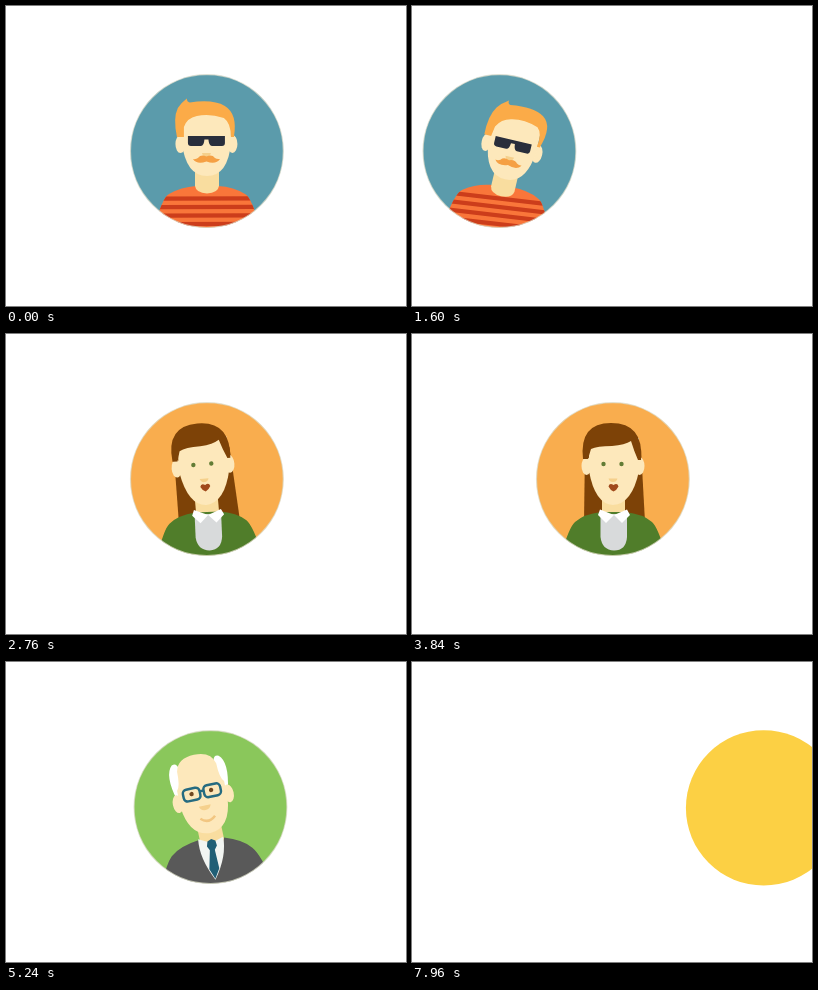
These frames come from a looping animation (400x300 px, 8 s). An HTML page:

```html
<!DOCTYPE html>
<html lang="en">
<head>
<meta charset="utf-8">
<title>Portrait carousel</title>
<style>
html, body { margin: 0; width: 100%; height: 100%; overflow: hidden; background: #fff; }
svg { display: block; width: 100vw; height: 100vh; }
.rim { fill: none; stroke: #dcdccb; stroke-width: 1.2; stroke-opacity: .75; }
.skin { fill: #fde8bb; }
.neck { fill: #f9dd9f; }
.shade { fill: #f5d08c; }
</style>
</head>
<body>
<svg viewBox="0 0 400 300">
  <defs>
    <clipPath id="disc"><circle cx="200.9" cy="145.1" r="76.7"/></clipPath>
    <clipPath id="shirt"><path id="torso" d="M146 232Q155 192 163 188Q175 181 190 180H212Q228 181 239 188Q247 192 256 232Z"/></clipPath>
  </defs>

  <g class="person">
    <g clip-path="url(#disc)">
      <circle cx="200.9" cy="145.1" r="76.7" fill="#5b9bab"/>
      <g class="body">
        <use href="#torso" fill="#f9763a"/>
        <path clip-path="url(#shirt)" d="M140 192.5H262M140 201H262M140 209.5H262M140 218H262" stroke="#cc3d1b" stroke-width="4.2"/>
      </g>
      <g class="head">
        <path class="neck" d="M189 160H213V180Q212 187 201 187.500Q190 187 189 180Z"/>
        <ellipse class="skin" cx="174.500" cy="138" rx="5" ry="9"/>
        <ellipse class="skin" cx="226.500" cy="138" rx="5" ry="9"/>
        <path class="skin" d="M176 107H225V137Q222 170 201 170Q180 170 176 137Z"/>
        <path class="hair" fill="#fbab48" d="M171 131Q167 112 172 102Q175 97 181 92.500Q181 96 184 96.500Q207 93 219 100Q232 108 228 131H225Q225 117 218 112Q203 107 191 110Q181 112 178 121V131Z"/>
        <path fill="#292e3b" d="M182 130H219V137Q219 140 216 140H206Q203 140 202.500 133.500H198.500Q198 140 195 140H185Q182 140 182 137Z"/>
        <path class="shade" d="M196 147H205Q204 151 200.500 151Q197 151 196 147Z"/>
        <path fill="#f5a044" d="M200.500 150.500Q206 148 209 152Q211 153.500 214 153Q210 159 200.500 155.500Q191 159 187 153Q190 153.500 192 152Q195 148 200.500 150.500Z"/>
      </g>
    </g>
    <circle class="rim" cx="200.9" cy="145.1" r="76.4"/>
  </g>

  <g class="person">
    <g clip-path="url(#disc)">
      <circle cx="200.9" cy="145.1" r="76.7" fill="#f9ad4e"/>
      <g class="head">
        <path fill="#7d4207" d="M173 115H229L233 188H172Z"/>
        <path class="neck" d="M190 155H213V184H190Z"/>
      </g>
      <g class="body">
        <path fill="#507d2a" d="M146 232Q156 194 163 188Q172 180 189 178H213Q231 180 240 188Q247 194 257 232Z"/>
        <path fill="#d8dadb" d="M188.500 180H215V203Q214 216.500 202 216.500Q190 216 188.500 203Z"/>
        <path fill="#fff" d="M188 175.500L202 181L194 189L186 181ZM215 175.500L202 181L210 189L218 181Z"/>
      </g>
      <g class="head">
        <ellipse class="skin" cx="174.500" cy="132" rx="5" ry="9"/>
        <ellipse class="skin" cx="227.500" cy="132" rx="5" ry="9"/>
        <path class="skin" d="M177 104H227V137Q220 170 201 171Q183 170 177 137Z"/>
        <path fill="#7d4207" d="M171 125Q167 89 199 89Q232 89 229 126H226Q222 117 219 107Q213 111 200 112Q185 112 179 115L176 125Z"/>
        <g class="eyes" fill="#627c35">
          <circle cx="191.500" cy="130" r="2.2"/><circle cx="209.500" cy="130" r="2.2"/>
        </g>
        <path class="shade" d="M196.500 144.500H205.500Q204.500 148 201 148Q197.500 148 196.500 144.500Z"/>
        <path fill="#a0491c" d="M201.500 151Q205.500 148.500 206.500 152.500Q204.500 156.500 201.500 157.500Q198.500 156.500 196.500 152.500Q197.500 148.500 201.500 151Z"/>
      </g>
    </g>
    <circle class="rim" cx="200.9" cy="145.1" r="76.4"/>
  </g>

  <g class="person">
    <g clip-path="url(#disc)">
      <circle cx="200.9" cy="145.1" r="76.7" fill="#8ac75b"/>
      <g class="head">
        <path class="neck" d="M189 160H213V184H189Z"/>
      </g>
      <g class="body">
        <path fill="#595959" d="M142 234Q152 199 160 190Q169 181 188 177L201 216L214 177Q232 181 241 190Q250 199 260 234Z"/>
        <path fill="#f2f5f2" d="M188 176L201 181L213 176Q215 195 201 218Q187 195 188 176Z"/>
        <path fill="#205f76" d="M197 179L201 177L205 179L206 184L203.500 188L206 207L201 217L196 207L198.500 188L196 184Z"/>
      </g>
      <g class="head">
        <path fill="#fff" d="M175 132Q168 105 177 97Q182 95 183 101L181 132ZM227 132Q234 105 225 97Q220 95 219 101L221 132Z"/>
        <ellipse class="skin" cx="175" cy="136" rx="5" ry="9"/>
        <ellipse class="skin" cx="227" cy="136" rx="5" ry="9"/>
        <path class="skin" d="M177 123Q181 119 181 104Q184 91 201 91Q218 91 221 104Q221 119 225 123V140Q222 170 201 171Q180 170 177 140Z"/>
        <g class="eyes" fill="#71471f">
          <circle cx="190.500" cy="129" r="2.200"/><circle cx="210.500" cy="129" r="2.200"/>
        </g>
        <g fill="none" stroke="#256b80" stroke-width="2.500">
          <rect x="182" y="123.500" width="17" height="12" rx="4"/>
          <rect x="203" y="123.500" width="17" height="12" rx="4"/>
          <path d="M199 128H203"/>
        </g>
        <path class="shade" d="M195 143H207Q206 147.500 201 147.500Q196 147.500 195 143Z"/>
        <path d="M194 155Q201 162 209 155" fill="none" stroke="#f2c681" stroke-width="2.500"/>
      </g>
    </g>
    <circle class="rim" cx="200.9" cy="145.1" r="76.4"/>
  </g>

  <g class="person"><circle cx="200.700" cy="145.900" r="77.700" fill="#fcd044"/></g>
</svg>
<script>
const LOOP = 8000, FIRST = 1124, STEP = 3117, MOVE = 1120, WIDTH = 400;
const BLINK = [2630, 2715];
// [ms since the slide began, degrees]
const LEAN_OUT = [[0, 0], [180, 1.5], [400, 7.5], [480, 13.5], [600, 16]];
const LEAN_IN = [[0, 16], [600, 16], [820, 0], [1000, -12], [1180, -12], [1640, -5], [2000, 0]];

const people = [...document.querySelectorAll('.person')].map(el => ({
  el,
  heads: el.querySelectorAll('.head'),
  hair: el.querySelector('.hair'),
  body: el.querySelector('.body'),
  eyes: el.querySelector('.eyes')
}));

// cubic-bezier(.7, 0, .3, 1)
function ease(x) {
  if (x <= 0) return 0;
  if (x >= 1) return 1;
  let lo = 0, hi = 1;
  for (let i = 0; i < 24; i++) {
    const s = (lo + hi) / 2, r = 1 - s;
    if (2.1 * s * r * r + 0.9 * s * s * r + s * s * s < x) lo = s; else hi = s;
  }
  return lo * lo * (3 - 2 * lo);
}

function track(keys, t) {
  if (t <= keys[0][0]) return keys[0][1];
  for (let i = 1; i < keys.length; i++) {
    const [a, from] = keys[i - 1], [b, to] = keys[i];
    if (t < b) return from + (to - from) * (t - a) / (b - a);
  }
  return keys[keys.length - 1][1];
}

const setTransform = (el, value) => el.setAttribute('transform', value);

function tilt(p, lean) {
  const pivot = 182 + 0.9 * lean;
  const drop = Math.max(0, lean) * 0.2;
  p.heads.forEach(h => setTransform(h, `translate(0 ${drop}) rotate(${lean} 201 ${pivot})`));
  setTransform(p.body, `rotate(${lean * 0.5} 201 ${pivot})`);
  if (p.hair) setTransform(p.hair, `translate(0 128) skewX(${-lean * 0.7}) translate(0 -128)`);
}

function pose(p, i, t) {
  const inT = t - FIRST - STEP * (i - 1);
  const outT = inT - STEP;
  const speedUp = 0.0035 * Math.max(0, outT - 480) ** 2;
  const x = WIDTH * (1 - ease(inT / MOVE)) - WIDTH * ease(outT / MOVE) - speedUp;
  p.el.style.display = Math.abs(x) < 279 ? '' : 'none';
  setTransform(p.el, `translate(${x.toFixed(2)} 0)`);
  if (!p.body) return;

  tilt(p, outT > 0 ? track(LEAN_OUT, outT) : track(LEAN_IN, inT));
  if (p.eyes) {
    const shut = inT >= BLINK[0] && inT < BLINK[1];
    setTransform(p.eyes, shut ? 'translate(0 129) scale(1 .35) translate(0 -129)' : '');
  }
}

const start = performance.now();
function draw(now) {
  const t = Math.max(0, now - start) % LOOP;
  people.forEach((p, i) => pose(p, i, t));
  requestAnimationFrame(draw);
}
draw(start);
</script>
</body>
</html>
```
